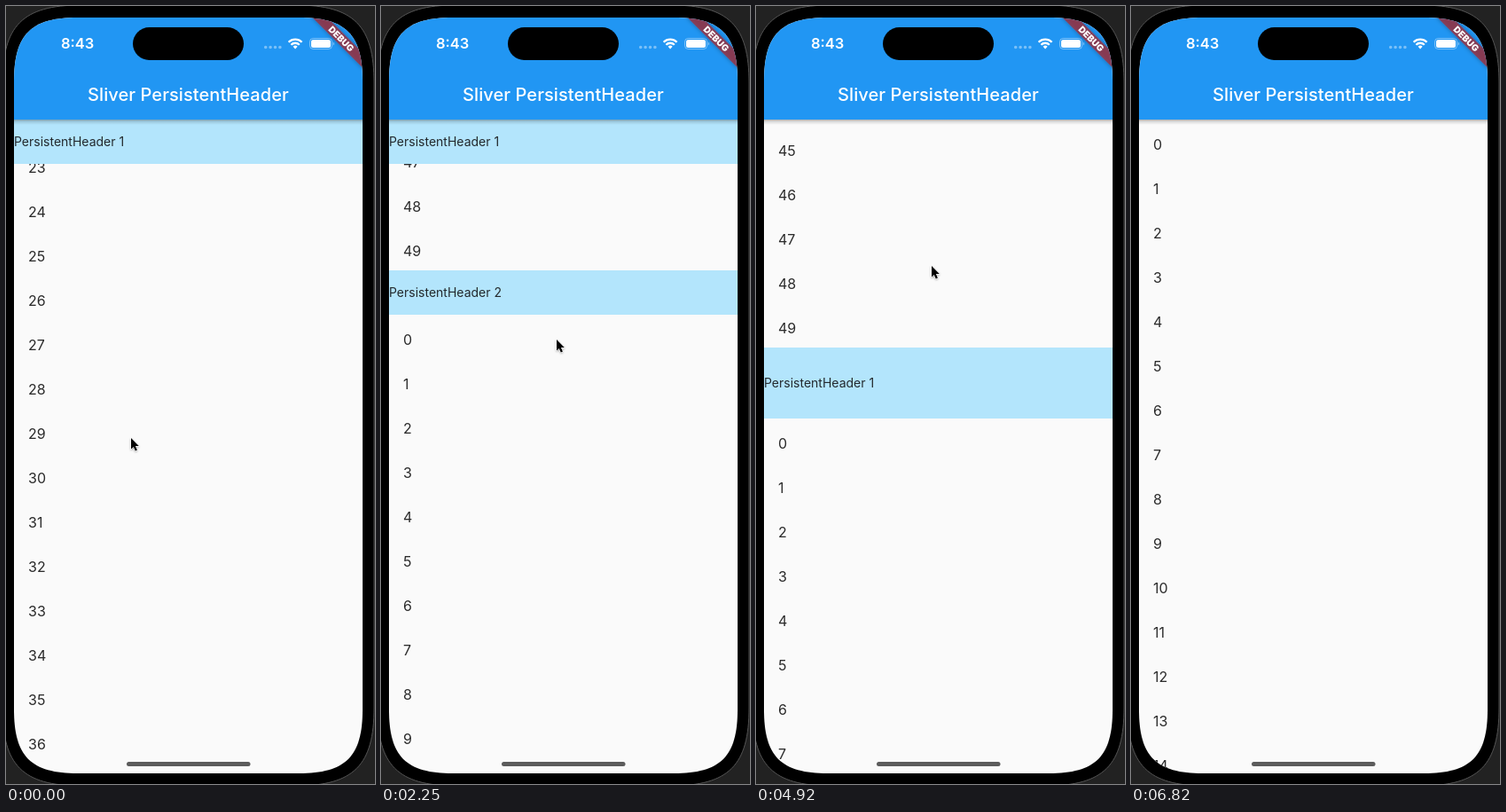
Recreate the animation shown at these times as an HTML page. Size 416 by 877 pixels, loop 6980 ms.

```html
<!DOCTYPE html>
<html lang="en">
<head>
<meta charset="utf-8">
<title>Sliver PersistentHeader</title>
<style>
  html, body { margin: 0; width: 100%; height: 100%; overflow: hidden; background: #222; }
  svg { display: block; font-family: Inter, "Open Sans", sans-serif; }
  .list { font-size: 16px; fill: #2b2b2b; }
  .header text { font-size: 14px; fill: #23292d; }
  .header rect { fill: #b3e5fc; }
  .bar { fill: #fff; }
</style>
</head>
<body>
<svg width="416" height="877" viewBox="0 0 416 877">
  <defs>
    <clipPath id="screen">
      <path d="M9 85C9 32 28 13 81 13H330C383 13 402 32 402 85V793C402 846 383 865 330 865H81C28 865 9 846 9 793Z"/>
    </clipPath>
    <linearGradient id="shade" x2="0" y2="1">
      <stop stop-color="#000" stop-opacity=".3"/>
      <stop offset=".4" stop-color="#000" stop-opacity=".12"/>
      <stop offset="1" stop-color="#000" stop-opacity="0"/>
    </linearGradient>
    <filter id="soft" x="-50%" y="-50%" width="200%" height="200%">
      <feDropShadow dx="0" dy="1" stdDeviation="1" flood-opacity=".35"/>
    </filter>
    <filter id="glow" x="-20%" y="-100%" width="140%" height="300%">
      <feDropShadow dx="0" dy="0" stdDeviation="2.5" flood-opacity=".5"/>
    </filter>
  </defs>

  <path d="M-4 87C-4 22 19-1 84-1H327C392-1 415 22 415 87V791C415 856 392 879 327 879H84C19 879-4 856-4 791Z" stroke="#555"/>
  <g clip-path="url(#screen)">
    <rect x="9" y="13" width="393" height="852" fill="#fafafa"/>
    <g id="lists"></g>
    <g class="header"><rect x="9" width="393"/><text x="9">PersistentHeader 1</text></g>
    <g class="header"><rect x="9" width="393"/><text x="9">PersistentHeader 2</text></g>
    <rect x="9" y="128" width="393" height="6" fill="url(#shade)"/>
    <rect x="9" y="13" width="393" height="115" fill="#2196f3"/>
    <g class="bar">
      <text x="205.5" y="107" text-anchor="middle" font-size="20" font-weight="500" letter-spacing=".08">Sliver PersistentHeader</text>
      <text x="62" y="48.3" font-size="16.5" font-weight="600">8:43</text>
      <path d="M292.7 46.5h17" fill="none" stroke="#fff" stroke-opacity=".4" stroke-width="3.6"
            stroke-linecap="round" stroke-dasharray="0 5.4"/>
      <g fill="none" stroke="#fff" stroke-width="2.3">
        <path d="M318.6 40.7a10.6 10.6 0 0 1 15 0M321.4 43.7a6.6 6.6 0 0 1 9.4 0"/>
      </g>
      <path d="M326.1 48.4l-2.5-2.6a3.6 3.6 0 0 1 5 0z"/>
      <rect x="342.5" y="36.5" width="25" height="12" rx="3.8" fill="none" stroke="#fff" stroke-opacity=".4"/>
      <rect x="344" y="38" width="22" height="9" rx="2.5"/>
      <path d="M368.8 40.5a2.2 2.2 0 0 1 0 4z" fill-opacity=".45"/>
    </g>
    <rect x="143" y="24" width="125" height="37" rx="18.5"/>
    <g transform="translate(402 13) rotate(45)">
      <rect x="-40" y="28" width="80" height="12" fill="#b71c1c" fill-opacity=".63" filter="url(#glow)"/>
      <text y="37.7" text-anchor="middle" font-size="10.2" font-weight="900" fill="#fff">DEBUG</text>
    </g>
    <rect x="136" y="852" width="139.5" height="5" rx="2.5" fill="#5c5c5c"/>
  </g>
  <path id="cursor" d="M0 0v12.6l2.8-2.7 2 4.6 2.1-.9-2-4.5h3.9z" stroke="#fff"
        paint-order="stroke" filter="url(#soft)"/>
</svg>

<script>
const LOOP = 6980, FRAMES = 47, TOP = 128, ROW = 50, COUNT = 50;
const LIST_STARTS = [0, 2580, 5130];
const HEADER_STARTS = [2500, 5080];

// time, scroll offset, cursor x, cursor y
const KEYS = [
  [0, 3704, 141, 487],
  [450, 4560, 160, 99],
  [900, 5134, 167, 236],
  [2250, 4910, 198, 376],
  [4180, 3178, 213, 461],
  [4910, 2243, 198, 293],
  [5800, 731, 254, 671],
  [6400, 110, 384, 854],
  [6820, 0, 384, 854]
];
const CURSOR_LEAVES = 6450;

const lists = document.getElementById('lists');
const cursor = document.getElementById('cursor');
const headers = [...document.querySelectorAll('.header')];

lists.innerHTML = LIST_STARTS.map(start => '<g class="list">' +
  Array.from({ length: COUNT }, (_, i) =>
    `<text x="25" y="${TOP + start + i * ROW + 34}">${i}</text>`).join('') + '</g>').join('');

const clamp = (v, lo, hi) => Math.min(hi, Math.max(lo, v));

const slope = (i, c) => (KEYS[i + 1][c] - KEYS[i][c]) / (KEYS[i + 1][0] - KEYS[i][0]);

// Harmonic-mean tangents keep the curve from overshooting its keys.
function tangent(i, c) {
  if (i === 0) return slope(0, c);
  if (i === KEYS.length - 1) return 0;
  const a = slope(i - 1, c), b = slope(i, c);
  return a * b > 0 ? 2 * a * b / (a + b) : 0;
}

function sample(t, c) {
  if (t >= KEYS[KEYS.length - 1][0]) return KEYS[KEYS.length - 1][c];
  const i = KEYS.findIndex(k => k[0] > t) - 1;
  const [a, b] = [KEYS[i], KEYS[i + 1]];
  const d = b[0] - a[0], u = (t - a[0]) / d, v = 1 - u;
  return v * v * (1 + 2 * u) * a[c] + u * u * (3 - 2 * u) * b[c] +
    d * u * v * (v * tangent(i, c) - u * tangent(i + 1, c));
}

const frameStart = k => 150 * k - 10 * Math.floor(k * k / 264);

function stepTime(t) {
  let k = FRAMES - 1;
  while (k > 0 && frameStart(k) > t) k--;
  return frameStart(k);
}

function placeHeader(header, y, height) {
  const [box, label] = header.children;
  box.setAttribute('y', y);
  box.setAttribute('height', height);
  label.setAttribute('y', y + height / 2 + 5);
}

function draw(now) {
  const t = stepTime(now % LOOP);
  const scroll = Math.round(sample(t, 1));
  lists.setAttribute('transform', `translate(0 ${-scroll})`);
  placeHeader(headers[0], Math.max(TOP, TOP + HEADER_STARTS[0] - scroll),
    clamp(80 + HEADER_STARTS[0] - scroll, 50, 80));
  placeHeader(headers[1], Math.max(TOP + 50, TOP + HEADER_STARTS[1] - scroll), 50);
  cursor.setAttribute('transform',
    `translate(${Math.round(sample(t, 2))} ${Math.round(sample(t, 3))})`);
  cursor.setAttribute('visibility', t > CURSOR_LEAVES ? 'hidden' : 'visible');
}

const begin = performance.now();
function tick() {
  draw(performance.now() - begin);
  requestAnimationFrame(tick);
}
tick();
</script>
</body>
</html>
```
